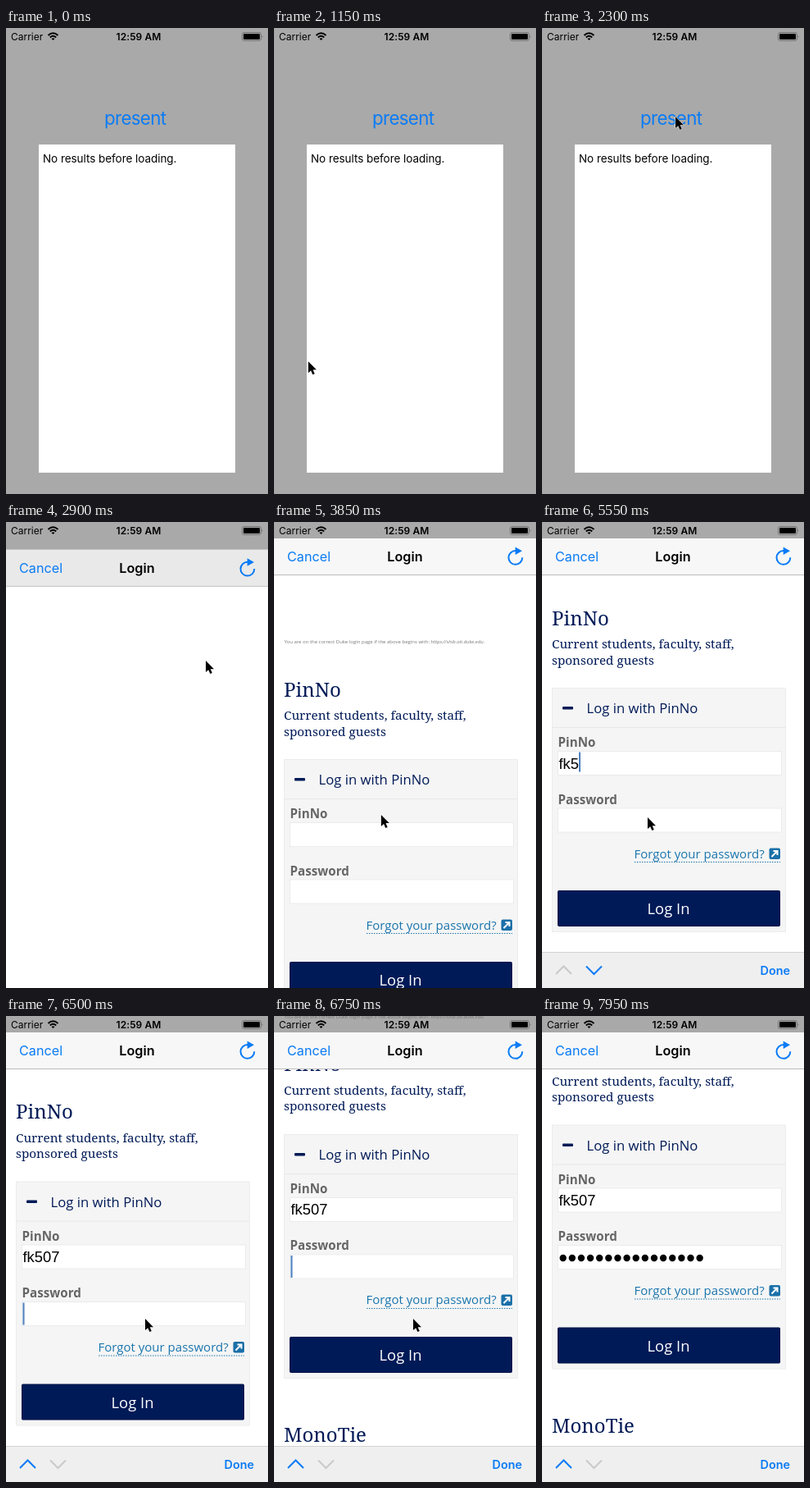
These frames come from a looping animation (320x568 px, 8 s). An HTML page:

```html
<!DOCTYPE html>
<html lang="en">
<head>
<meta charset="utf-8">
<title>Login flow</title>
<style>
  html, body { margin: 0; width: 100%; height: 100%; overflow: hidden; background: #a9a9a9; }
  svg { display: block; width: 100%; height: 100%; }
  text { font-family: Inter, Roboto, sans-serif; white-space: pre; }
  .blue { fill: #0a7bf5; }
  .line { fill: none; stroke: #0a7bf5; stroke-width: 2; }
  .serif { font-family: "Noto Serif", serif; fill: #001a57; }
  .sans { font-family: "Open Sans", sans-serif; }
  .label { font: bold 15.2px "Open Sans", sans-serif; fill: #666; }
  .typed { font: 18.4px "Liberation Sans", sans-serif; }
  .field { fill: #fff; stroke: #e6e6e6; stroke-width: .7; }
  .semi { font-weight: 600; }
</style>
</head>
<body>
<svg viewBox="0 0 320 568">
  <rect width="320" height="568" fill="#a9a9a9"/>
  <text class="blue" x="120" y="118" font-size="22.3" letter-spacing="-.65">present</text>
  <rect x="40" y="142" width="240" height="400" fill="#fff"/>
  <text x="45" y="164" font-size="13.5" letter-spacing="-.05">No results before loading.</text>

  <g id="modal">
    <rect width="320" height="20" fill="#a9a9a9"/>
    <rect y="20" width="320" height="568" fill="#fff"/>
    <g id="page">
      <text class="sans" x="12.5" y="61" font-size="6" fill="#777">You are on the correct Duke login page if the above begins with: <tspan font-style="italic">https://shib.oit.duke.edu.</tspan></text>
      <text class="serif" x="12" y="125.5" font-size="24">PinNo</text>
      <text class="serif" x="12" y="154" font-size="15.3">Current students, faculty, staff,</text>
      <text class="serif" x="12" y="173.5" font-size="15.3">sponsored guests</text>
      <rect x="12.5" y="202.5" width="285" height="297" fill="#f5f5f5" stroke="#ececec"/>
      <path d="M13 250.5H297" stroke="#e8e8e8"/>
      <rect x="25" y="225" width="13" height="3.5" rx="1" fill="#001a57"/>
      <text class="sans" x="54.5" y="233" font-size="16.7" fill="#001a57">Log in with PinNo</text>
      <text class="label" x="19.5" y="274">PinNo</text>
      <rect class="field" x="19.5" y="279.5" width="273" height="29"/>
      <text class="typed" id="user" x="20.5" y="300.5"></text>
      <text class="label" x="19.5" y="343.5">Password</text>
      <rect class="field" x="19.5" y="349" width="273" height="29"/>
      <g id="dots"></g>
      <rect id="caret" width="2" fill="#4a7fbd"/>
      <text class="sans" x="112.5" y="409.5" font-size="15" fill="#1a75ad">Forgot your password?</text>
      <path d="M113 414.5H291" stroke="#1a75ad" stroke-dasharray="1.5 1.5"/>
      <rect x="277.5" y="397.5" width="13.5" height="13.5" rx="2" fill="#1a70a8"/>
      <path d="M280.5 408L286.5 402M282.5 401H287.5V406" fill="none" stroke="#fff" stroke-width="2"/>
      <rect x="19.5" y="449.5" width="271" height="43" rx="1" fill="#001a57" stroke="#001247"/>
      <text class="sans" x="128.5" y="478" font-size="18.4" fill="#fff">Log In</text>
      <text class="serif" x="12" y="577" font-size="24">MonoTie</text>
    </g>
    <rect id="nav" y="20" width="320" height="44"/>
    <path d="M0 64.5H320" stroke="#bcbcbc"/>
    <text class="blue" x="16" y="48" font-size="16.2">Cancel</text>
    <text class="semi" x="160" y="48" font-size="16.2" text-anchor="middle">Login</text>
    <path class="line" d="M303.3 43.3A8.4 8.4 0 1 1 295 35"/>
    <path class="blue" d="M294.7 30.5L303 35.2L294.7 40Z"/>
  </g>

  <g id="bar">
    <rect y="524" width="320" height="44" fill="#efefef"/>
    <path d="M0 524.5H320" stroke="#d2d2d2"/>
    <path class="line" id="up" d="M17 551L26.5 541.5L36 551"/>
    <path class="line" id="down" d="M54 541.5L63.5 551L73 541.5"/>
    <text class="blue semi" x="266.5" y="552" font-size="14.4">Done</text>
  </g>

  <text x="6" y="14.5" font-size="12">Carrier</text>
  <g fill="none" stroke="#000" stroke-width="2">
    <path d="M51.5 9Q57.5 3.5 63.5 9"/>
    <path d="M53.8 11.4Q57.5 8 61.2 11.4"/>
  </g>
  <path d="M55.5 13Q57.5 11.4 59.5 13L57.5 15Z"/>
  <text class="semi" x="162" y="14.5" font-size="12" text-anchor="middle" letter-spacing=".1">12:59 AM</text>
  <rect x="288.5" y="5.5" width="23" height="10" rx="2.5" fill="none" stroke="#666" stroke-width=".8"/>
  <rect x="290" y="7" width="20" height="7" rx="1.2"/>
  <path d="M312.8 9Q314.6 10.5 312.8 12Z" fill="#666"/>

  <path id="pointer" d="M0 0V14L3.2 11.2L5.4 16L7.8 15L5.7 10.2H10Z" stroke="#fff" stroke-width="1" paint-order="stroke"/>
</svg>
<script>
const LOOP = 8000, PRESENT = 2456, LOADED = 3450, FOCUS_USER = 4088, FOCUS_PASS = 6491;
const USER = 'fk507', KEY_TIMES = [4950, 5200, 5480, 5800, 6020];
const DOT_COUNT = 16, DOT_START = 6960, DOT_STEP = 24;
const POINTER = [
  [600, 20, 421], [1100, 40, 411], [1800, 163, 108], [2520, 163, 108],
  [2900, 244, 169], [3250, 244, 169], [3900, 129, 360],
  [6100, 129, 360], [6440, 170, 369], [7000, 170, 369]
];
const $ = id => document.getElementById(id);
const move = (el, x, y) => el.setAttribute('transform', `translate(${x} ${y})`);
const show = (el, on) => { el.style.display = on ? '' : 'none'; };

$('dots').innerHTML = Array.from({ length: DOT_COUNT }, (_, i) =>
  `<circle cx="${25.7 + i * 11.13}" cy="364.5" r="4.2"/>`).join('');

// Share of the way still to go in a critically damped spring.
function remaining(t, start) {
  const x = Math.max(0, t - start) * 0.0125;
  return (1 + x) * Math.exp(-x);
}

function pointerAt(t) {
  const next = POINTER.findIndex(p => p[0] > t);
  if (next < 1) return null;
  const [t0, x0, y0] = POINTER[next - 1], [t1, x1, y1] = POINTER[next];
  const u = (t - t0) / (t1 - t0), e = u * u * (3 - 2 * u);
  return [x0 + (x1 - x0) * e, y0 + (y1 - y0) * e];
}

function draw(t) {
  const inPass = t >= FOCUS_PASS;
  show($('modal'), t >= PRESENT);
  move($('modal'), 0, 548 * remaining(t, PRESENT));
  const tone = 233 + 14 * Math.min(1, Math.max(0, (t - 2950) / 200));
  $('nav').setAttribute('fill', `rgb(${tone},${tone},${tone})`);

  show($('page'), t >= LOADED);
  move($('page'), 0, 87 * remaining(t, FOCUS_USER) - 69.5 * (1 - remaining(t, FOCUS_PASS)));

  const keys = KEY_TIMES.filter(k => k <= t).length;
  const dots = Math.min(DOT_COUNT, Math.max(0, Math.floor((t - DOT_START) / DOT_STEP)));
  $('user').textContent = USER.slice(0, keys);
  [...$('dots').children].forEach((dot, i) => show(dot, i < dots));

  const lastInput = inPass
    ? (dots ? DOT_START + dots * DOT_STEP : FOCUS_PASS)
    : (keys ? KEY_TIMES[keys - 1] : FOCUS_USER);
  const typedWidth = inPass ? dots * 11.13 : keys ? $('user').getComputedTextLength() : 0;
  const caret = $('caret');
  show(caret, t >= FOCUS_USER && (t - lastInput) % 1000 < 580);
  caret.setAttribute('x', 20.5 + typedWidth);
  caret.setAttribute('y', inPass ? 350 : 280.5);
  caret.setAttribute('height', keys && !inPass ? 24 : 27);

  show($('bar'), t >= FOCUS_USER);
  move($('bar'), 0, 44 * remaining(t, FOCUS_USER));
  $('up').style.stroke = inPass ? '' : '#c9c9c9';
  $('down').style.stroke = inPass ? '#c9c9c9' : '';

  const at = pointerAt(t);
  show($('pointer'), at);
  if (at) move($('pointer'), ...at);
}

const begin = performance.now();
function tick() {
  draw((performance.now() - begin) % LOOP);
  requestAnimationFrame(tick);
}
tick();
</script>
</body>
</html>
```
